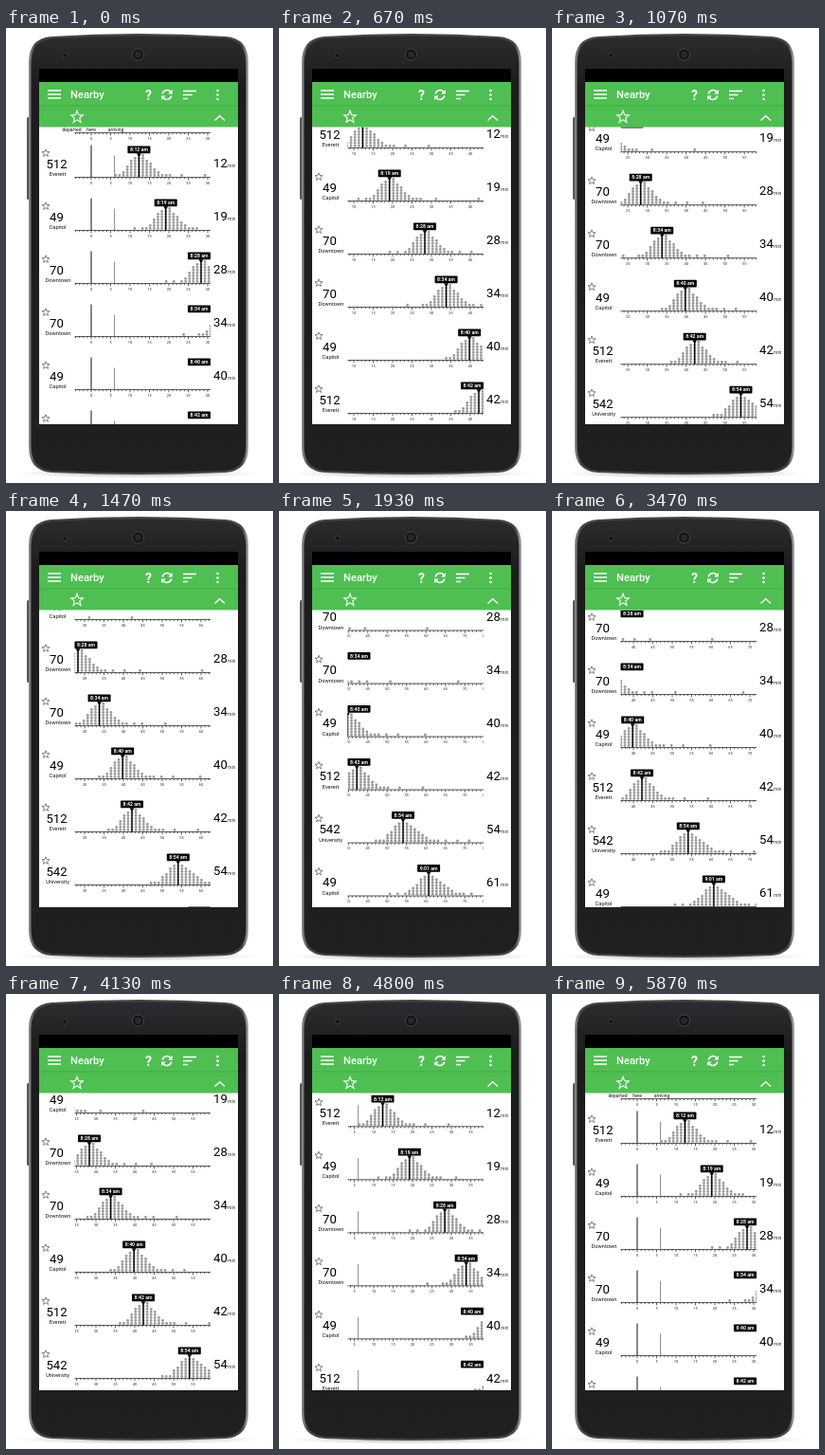
An HTML page for the animation above (7.47 s loop, 282x480 px).

```html
<!DOCTYPE html>
<html lang="en">
<head>
<meta charset="utf-8">
<title>Nearby arrivals</title>
<style>
  html, body { margin: 0; width: 100%; height: 100%; overflow: hidden; background: #fff; }
  svg { display: block; width: 282px; height: 480px; font-family: Roboto, Arial, sans-serif; }
  .mid { text-anchor: middle; }
  .num { font-size: 13.2px; fill: #000; }
  .place { font-size: 5.7px; fill: #111; }
  .unit { font-size: 5px; fill: #333; }
  .tick { font-size: 4px; fill: #333; text-anchor: middle; }
  .legend { font-size: 5px; fill: #111; }
  .time { font-size: 5.2px; font-weight: 700; fill: #fff; text-anchor: middle; }
  .axis { fill: none; stroke: #333; stroke-width: .8; }
  .dots { fill: none; stroke: #999; stroke-width: 2.9; stroke-linecap: round; }
  .star { fill: none; stroke: #333; stroke-width: .6; stroke-linejoin: round; }
  .icon { fill: none; stroke: #fff; stroke-width: 1.5; }
</style>
</head>
<body>
<svg viewBox="0 0 282 480">
  <defs>
    <linearGradient id="rim" x2="1" y2="0">
      <stop offset="0" stop-color="#8a8a8a"/>
      <stop offset=".03" stop-color="#444"/>
      <stop offset=".97" stop-color="#444"/>
      <stop offset="1" stop-color="#a8a8a8"/>
    </linearGradient>
    <linearGradient id="face" x2="0" y2="1">
      <stop offset="0" stop-color="#2c2c2e"/>
      <stop offset=".12" stop-color="#1c1c1d"/>
      <stop offset="1" stop-color="#202021"/>
    </linearGradient>
    <radialGradient id="shade">
      <stop offset="0" stop-color="#777" stop-opacity=".6"/>
      <stop offset="1" stop-color="#999" stop-opacity="0"/>
    </radialGradient>
    <clipPath id="list"><rect x="35" y="104.5" width="210" height="313.5"/></clipPath>
    <clipPath id="chart"><rect x="72.5" y="-40" width="143.5" height="52"/></clipPath>
    <clipPath id="name"><rect x="40" y="-10" width="28" height="14"/></clipPath>
  </defs>

  <ellipse cx="140" cy="470" rx="130" ry="5" fill="url(#shade)"/>
  <rect x="22" y="94" width="4" height="87" rx="1.5" fill="#555"/>
  <path d="M24 36Q24 11 48 9Q140 3 232 9Q256 11 256 36V442Q256 467 232 469Q140 473 48 469Q24 467 24 442Z" fill="url(#rim)"/>
  <path d="M26.5 37Q26.500 13 49 11Q140 5.500 231 11Q253.500 13 253.500 37V441Q253.500 465 231 467Q140 471 49 467Q26.500 465 26.500 441Z" fill="url(#face)"/>
  <circle cx="139.500" cy="28" r="6" fill="#111" stroke="#48484a"/>
  <circle cx="139.500" cy="28" r="3.500" fill="#29292b"/>
  <circle cx="62" cy="29" r="2.500" fill="#111" stroke="#444" stroke-width=".8"/>
  <rect x="35" y="43" width="210" height="375" fill="#fff"/>

  <g clip-path="url(#list)"><g id="rows"></g></g>

  <rect x="35" y="43" width="210" height="14.500" fill="#000"/>
  <rect x="35" y="57" width="210" height="47.500" fill="#4fbf52"/>
  <rect x="35" y="81.500" width="210" height="1" fill="#3fa944"/>
  <path class="icon" d="M44 66H58M44 70H58M44 74H58M187 66.500H201M187 70.500H196.500M187 74.500H192"/>
  <text x="68" y="74" font-size="11.200" font-weight="500" fill="#fff">Nearby</text>
  <text class="mid" x="150.500" y="75.500" font-size="14" font-weight="700" fill="#fff">?</text>
  <path class="icon" d="M165.200 69.500A5 5 0 0 1 174 67.500M174.800 71.500A5 5 0 0 1 166 73.500"/>
  <path fill="#fff" d="M175.800 65V69.500H171.300ZM164.200 76V71.500H168.700Z"/>
  <g fill="#fff"><circle cx="223.500" cy="66" r="1.300"/><circle cx="223.500" cy="70.500" r="1.300"/><circle cx="223.500" cy="75" r="1.300"/></g>
  <path id="fav" class="icon" style="stroke-width:1.100"/>
  <path class="icon" d="M220.500 97.500L225.700 92.700L231 97.500"/>
</svg>

<script>
const UNIT = 4.1, ZERO = 90, LEFT = 72.5, RIGHT = 216;
const FIRST = 157.5, PITCH = 56, FPS = 15, LOOP = 7470;

// line, place, wait, clock, exact minute, spread, stray dots around the marker
const trips = [
  [512, 'Everett', 12, '8:12', 12.3, 1, [-6, 8, 11, 17]],
  [49, 'Capitol', 19, '8:19', 19.2, 1, [-8, -6, 8, 12, 23]],
  [70, 'Downtown', 28, '8:28', 28.3, 1, [-9, -7, 9, 12, 16, 32]],
  [70, 'Downtown', 34, '8:34', 33.8, 1, [-10, -6, 9, 11, 17, 34.5]],
  [49, 'Capitol', 40, '8:40', 39.8, 1, [-6, 8, 10, 13, 20]],
  [512, 'Everett', 42, '8:42', 42.2, 1, [-6, 8, 11, 17]],
  [542, 'University', 54, '8:54', 54.1, 1.15, [-7, 9, 11, 14, 17, 22]],
  [49, 'Capitol', 61, '9:01', 60.7, 1.25, [-10, -8, 9, 11, 15]],
  [44, 'Downtown', 67, '9:07', 67.3, 1.15, [-8, 9, 12]]
];

// step, vertical scroll, time shift
const path = [[0, 0, 0], [10, 31, 52], [17, 88, 118], [22, 99, 130], [27, 132, 168], [36, 172, 212]];

const rows = document.getElementById('rows');
const minuteX = m => ZERO + m * UNIT;

function add(parent, tag, attrs, text) {
  const el = document.createElementNS('http://www.w3.org/2000/svg', tag);
  for (const k in attrs) el.setAttribute(k, attrs[k]);
  if (text !== undefined) el.textContent = text;
  return parent.appendChild(el);
}

function starPath(cx, cy, r) {
  let d = '';
  for (let i = 0; i < 10; i++) {
    const a = (i / 5 - .5) * Math.PI, q = i % 2 ? r * .43 : r;
    d += (i ? 'L' : 'M') + (cx + q * Math.cos(a)).toFixed(2) + ' ' + (cy + q * Math.sin(a)).toFixed(2);
  }
  return d + 'Z';
}

function addAxis(parent) {
  const clip = add(parent, 'g', { 'clip-path': 'url(#chart)' });
  const plot = add(clip, 'g', {});
  let d = 'M0 0H500';
  for (let m = -5; m <= 92; m++) {
    d += `M${minuteX(m)} 0v${m % 5 ? 1.7 : 2.8}`;
    if (m >= 0 && m % 5 === 0) add(plot, 'text', { class: 'tick', x: minuteX(m), y: 7.4 }, m);
  }
  add(plot, 'path', { class: 'axis', d });
  return plot;
}

function dotPath(minute, spread, strays) {
  let d = '';
  const put = (k, n) => {
    for (let i = 0; i < n; i++) d += `M${minuteX(minute + k).toFixed(2)} ${-2.1 - i * 3}h.01`;
  };
  for (let k = -9; k <= 10; k++) {
    const sigma = (k < 0 ? 2.4 : 3) * spread;
    put(k, Math.round(8 / Math.sqrt(spread) * Math.exp(-k * k / (2 * sigma * sigma))));
  }
  strays.forEach(k => put(k, 1));
  return d;
}

function addTrip([line, place, wait, clock, minute, spread, strays], i) {
  const row = add(rows, 'g', { transform: `translate(0 ${FIRST + i * PITCH})` });
  add(row, 'path', { class: 'star', d: starPath(42, -25.5, 4.2) });
  add(row, 'text', { class: 'num mid', x: 53.5, y: -9.8 }, line);
  const name = add(row, 'g', { 'clip-path': 'url(#name)' });
  const wide = place === 'Downtown';
  add(name, 'text', { class: wide ? 'place' : 'place mid', x: wide ? 41.5 : 54.5, y: -1.5 }, place);
  add(row, 'text', { class: 'num', x: 219, y: -10.3 }, wait);
  add(row, 'text', { class: 'unit', x: 234, y: -10.3 }, 'min');

  const plot = addAxis(row), x = minuteX(minute);
  add(plot, 'path', { d: `M${minuteX(0)} -34V0`, stroke: '#111', 'stroke-width': 1 });
  add(plot, 'path', { d: `M${minuteX(6)} -23V0`, stroke: '#888', 'stroke-width': 1 });
  add(plot, 'path', { class: 'dots', d: dotPath(minute, spread, strays) });
  add(plot, 'path', { d: `M${x} -25V0`, stroke: '#000', 'stroke-width': 1.3 });
  add(plot, 'path', { d: `M${x - 2.5} -25.3h5l-2.5 3.500Z` });

  const tag = add(row, 'g', {});
  add(tag, 'rect', { x: -12, y: -33, width: 24, height: 7.8, rx: .8 });
  add(tag, 'text', { class: 'time', y: -27.2 }, clock + ' am');
  return { plot, tag, x };
}

const head = add(rows, 'g', { transform: 'translate(0 110.5)' });
[['departed', 69.5], ['here', 90], ['arriving', 116]].forEach(([word, x]) =>
  add(head, 'text', { class: 'legend mid', x, y: -1.7 }, word));
const headPlot = addAxis(head);
const views = trips.map(addTrip);
document.getElementById('fav').setAttribute('d', starPath(75, 94, 6.7));

// Monotone cubic through the points of `path`
function follow(p, col) {
  const last = path.length - 1;
  const rise = i => (path[i + 1][col] - path[i][col]) / (path[i + 1][0] - path[i][0]);
  const slope = i => {
    if (i === 0 || i === last) return 0;
    const a = rise(i - 1), b = rise(i);
    return 2 * a * b / (a + b);
  };
  let i = 0;
  while (i < last - 1 && p > path[i + 1][0]) i++;
  const h = path[i + 1][0] - path[i][0], u = (p - path[i][0]) / h;
  const v = u * u * (3 - 2 * u);
  return path[i][col] * (1 - v) + path[i + 1][col] * v
    + h * u * (1 - u) * (slope(i) * (1 - u) - slope(i + 1) * u);
}

function draw(ms) {
  const step = Math.floor((ms % LOOP + 4) * FPS / 1000);
  const p = Math.max(0, Math.min(step, 36, 79 - step));
  const shift = follow(p, 2), move = `translate(${-shift.toFixed(2)} 0)`;
  rows.setAttribute('transform', `translate(0 ${-follow(p, 1).toFixed(2)})`);
  headPlot.setAttribute('transform', move);
  for (const { plot, tag, x } of views) {
    plot.setAttribute('transform', move);
    const at = Math.max(LEFT + 12, Math.min(RIGHT - 12, x - shift));
    tag.setAttribute('transform', `translate(${at.toFixed(2)} 0)`);
  }
}

const start = performance.now();
function tick() {
  draw(performance.now() - start);
  requestAnimationFrame(tick);
}
tick();
</script>
</body>
</html>
```
